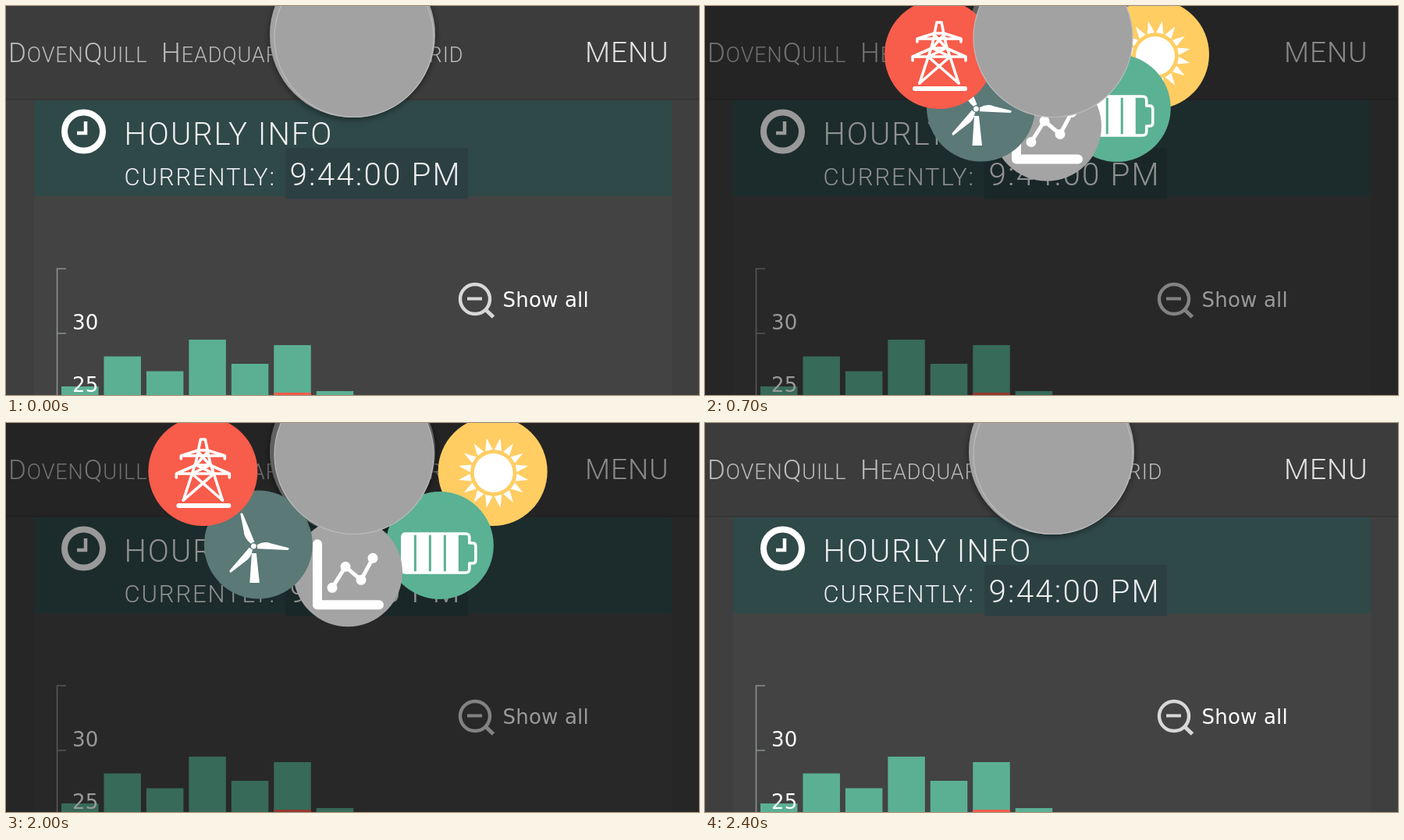
Animation, 888 px wide and 499 px high, one loop 3000 ms. Source, as an HTML page:

```html
<!DOCTYPE html>
<html lang="en">
<head>
<meta charset="utf-8">
<title>Hourly info menu</title>
<style>
  html, body { margin: 0; width: 100%; height: 100%; overflow: hidden; background: #3f3f3f; }
  svg { display: block; }
  .light { font-family: Roboto, sans-serif; font-weight: 300; fill: #f0f0f0; }
  .site { font-size: 27px; letter-spacing: .9px; fill: #bcbcbc; }
  .site .cap { font-size: 35px; }
  .chart { font: 26px "DejaVu Sans", sans-serif; letter-spacing: .2px; fill: #fff; }
  .line { fill: none; stroke: #fff; stroke-linecap: round; stroke-linejoin: round; }
  .solid { fill: #fff; }
</style>
</head>
<body>
<svg width="888" height="499" viewBox="0 0 888 499">
  <defs>
    <filter id="shadow" x="-20%" y="-20%" width="140%" height="140%">
      <feDropShadow dx="0" dy="2" stdDeviation="4" flood-color="#000" flood-opacity=".5"/>
    </filter>
  </defs>

  <rect width="888" height="499" fill="#3f3f3f"/>
  <rect x="36" y="121" width="817" height="378" fill="#434343"/>
  <rect width="888" height="120" fill="#3c3c3c"/>
  <rect y="119" width="888" height="1.5" fill="#343434"/>
  <rect x="36" y="121" width="817" height="123" fill="#2f4848"/>
  <rect x="358" y="182" width="234" height="65.5" fill="#2c4042"/>

  <g class="light">
    <text class="site" x="3" y="72"><tspan class="cap">D</tspan>OVEN<tspan class="cap">Q</tspan>UILL</text>
    <text class="site" x="199" y="72"><tspan class="cap">H</tspan>EADQUARTERS<tspan class="cap"> M</tspan>ICROGRID</text>
    <text x="742" y="72" font-size="37" letter-spacing="1" fill="#e4e4e4">MENU</text>
    <text x="151.5" y="178" font-size="40" letter-spacing="2">HOURLY INFO</text>
    <text x="151.5" y="230" font-size="31" letter-spacing="1.9">CURRENTLY:</text>
    <text x="363.5" y="230" font-size="40.5" letter-spacing="2.1">9:44:00 PM</text>
  </g>

  <circle class="line" cx="99.5" cy="161" r="24.5" stroke-width="8"/>
  <path d="M102 148V163H91" fill="none" stroke="#fff" stroke-width="4.5"/>

  <path d="M77 337H65.5V499M65.5 420H77" fill="none" stroke="#8a918e" stroke-width="1.6"/>
  <g id="bars" fill="#5bb093"></g>
  <rect x="343.5" y="496" width="47.5" height="3" fill="#f85c4b"/>
  <g class="chart">
    <text x="85" y="414.5">30</text>
    <text x="85" y="495">25</text>
    <text x="636.5" y="385.5">Show all</text>
  </g>
  <g fill="none" stroke="#d8d8d8">
    <circle cx="601" cy="376" r="19" stroke-width="4.4"/>
    <path d="M591 375.5H610" stroke-width="4"/>
    <path d="M614.5 389.5L624.5 399" stroke-width="5"/>
  </g>
  <circle cx="444" cy="37" r="106" fill="#a2a2a2" filter="url(#shadow)"/>

  <rect id="dim" width="888" height="499" fill="#020100" opacity="0"/>

  <g id="sun">
    <circle r="70" fill="#ffcd62"/>
    <circle class="solid" cx="1" cy="2" r="25"/>
    <path id="rays" class="solid"/>
  </g>
  <g id="battery">
    <circle r="69" fill="#5bb193"/>
    <path class="line" stroke-width="3.6" d="M-44 -15H33Q38 -15 38 -10V-3H42Q46 -3 46 1V19Q46 23 42 23H38V30Q38 35 33 35H-44Q-48 35 -48 30V-10Q-48 -15 -44 -15Z"/>
    <path class="solid" d="M-48 -15H-33V35H-48ZM-30 -15H-14V35H-30ZM-11 -15H5V35H-11ZM8 -15H24V35H8Z"/>
  </g>
  <g id="graph">
    <circle r="70" fill="#a4a4a4"/>
    <path class="line" stroke-width="12" d="M-39 -36V42H40"/>
    <path class="line" stroke-width="5" d="M-20 20L-3 -7L17 10L32 -18"/>
    <path class="line" stroke-width="13" d="M-20 20h0M-3 -7h0M17 10h0M32 -18h0"/>
  </g>
  <g id="turbine">
    <circle r="69.5" fill="#5a7977"/>
    <path class="solid" d="M-8.5 11L-2.5 11L1.5 49H-11Z"/>
    <g id="blades" class="solid" transform="translate(-6 2)"></g>
    <circle cx="-6" cy="2" r="4" fill="#fff" stroke="#5a7977" stroke-width="1.2"/>
  </g>
  <g id="tower">
    <circle r="70" fill="#f85c4b"/>
    <path class="line" stroke-width="6" d="M-31 44H33"/>
    <g class="line" stroke-width="3.6">
      <path d="M-25 37L-9 -12L-3 -41H3L9 -12L25 37"/>
      <path d="M-28 -16V-20L-6 -27H6L28 -20V-16M-28 -20H28"/>
      <path d="M-34 8V3L-9 -8H9L34 3V8M-34 3H34"/>
      <path d="M-6 -25L9 -8M6 -25L-9 -8M-9 -8L14 3M9 -8L-14 3M-14 3L25 37M14 3L-25 37"/>
    </g>
  </g>

  <circle cx="446" cy="40.5" r="102" fill="#a2a2a2" stroke="#bcbcbc" stroke-width="1.2"/>
</svg>
<script>
const LOOP = 3000;
const $ = id => document.getElementById(id);

// Closed and open centre of each menu button
const buttons = {
  sun: [433, 62, 719, 62],
  battery: [443.5, 53, 612, 209],
  graph: [438, 44, 438, 265],
  turbine: [444, 52, 263, 208],
  tower: [443, 62, 157, 62]
};

// Start time, how far open (in sixths), page dimming
const steps = [
  [0, 0, 0],
  [500, 1, .11], [600, 2, .11], [700, 3, .4], [800, 4, .4], [900, 6, .58],
  [2000, 4, .4], [2100, 3, .4], [2200, 2, .11], [2300, 1, .11], [2400, 0, 0]
];

$('bars').innerHTML = [488, 449.5, 468.5, 428, 459, 435, 494].map((y, i) =>
  `<rect x="${71 + i * 54.45}" y="${y}" width="47.5" height="${499 - y}"/>`).join('');

$('blades').innerHTML = [-111, 4, 132].map(a =>
  `<path transform="rotate(${a})" d="M4 -2Q14 -8 22 -5L45 -1Q46 1 44 2L5 3Z"/>`).join('');

const polar = (r, a) => `${(1 + r * Math.cos(a)).toFixed(2)} ${(2 + r * Math.sin(a)).toFixed(2)}`;
$('rays').setAttribute('d', Array.from({ length: 16 }, (_, i) => {
  const a = (i + .5) * Math.PI / 8;
  return `M${polar(30, a - .16)}L${polar(45.5, a)}L${polar(30, a + .16)}Z`;
}).join(''));

function draw() {
  const t = performance.now() % LOOP;
  const [, sixths, dim] = steps.findLast(s => s[0] <= t);
  const p = sixths / 6;
  for (const [id, [x0, y0, x1, y1]] of Object.entries(buttons)) {
    $(id).setAttribute('transform', `translate(${x0 + (x1 - x0) * p} ${y0 + (y1 - y0) * p})`);
  }
  $('dim').setAttribute('opacity', dim);
  requestAnimationFrame(draw);
}
draw();
</script>
</body>
</html>
```
